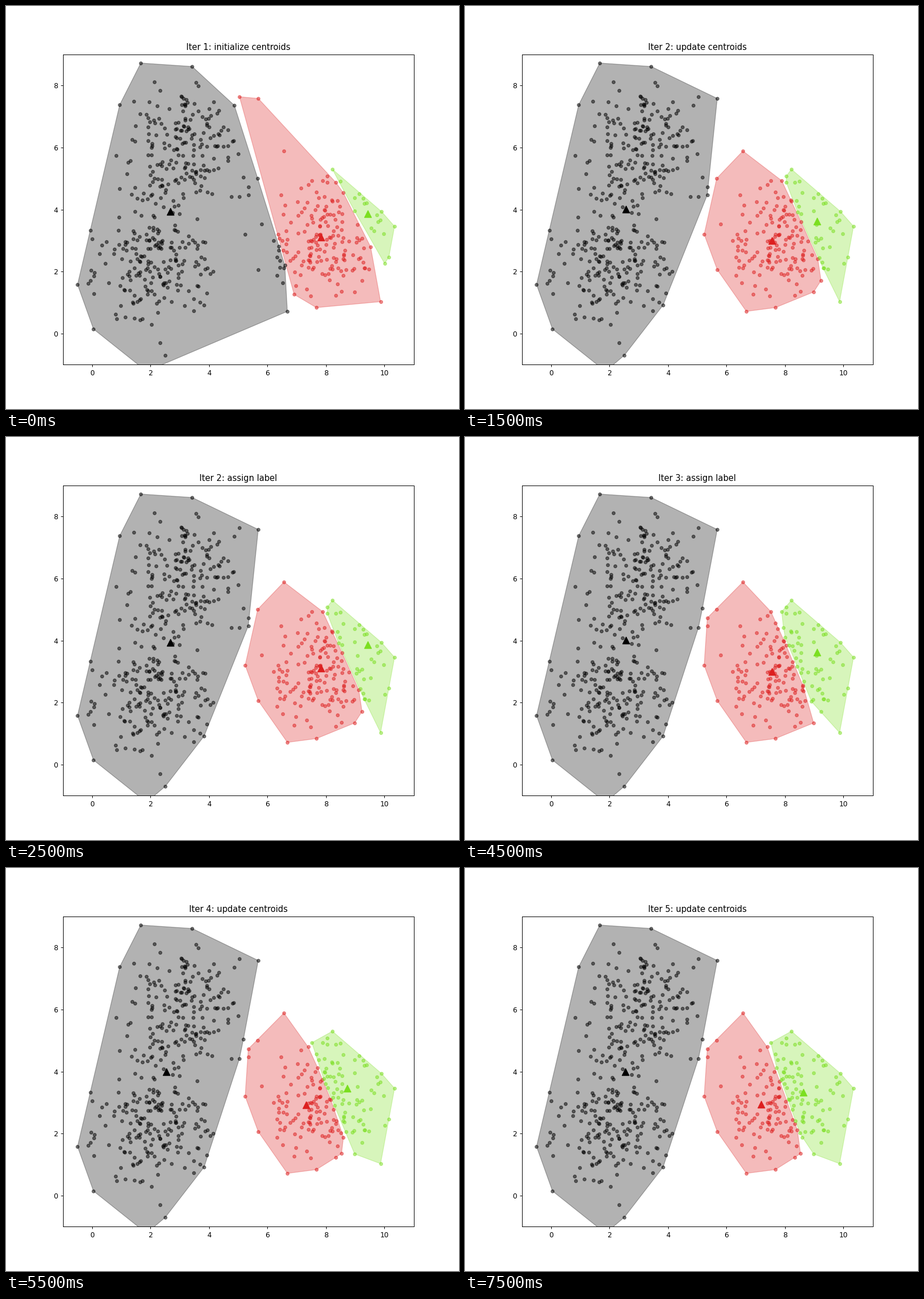
Recreate the animation shown at these times as a matplotlib script. Size 794x706 px, loop 8 s.

```python
import numpy as np
import matplotlib.pyplot as plt
from matplotlib.animation import FuncAnimation

W, H, DPI = 794, 706, 88
ORIGIN = np.array([150.5, 574.0])
UNIT = np.array([51.28, -54.36])
COLORS = ["#000000", "#dd2020", "#7bdf20"]


def to_data(*stage_xy):
    return (np.array(stage_xy, float) - ORIGIN) / UNIT


# Outlines that hold the random points, in stage pixels
LEFT = to_data((236, 100), (326, 106), (400, 174), (416, 300), (409, 334),
               (347, 524), (279, 612), (246, 640), (153, 566), (125, 488),
               (148, 393), (199, 173))
RIGHT = to_data((424.5, 317), (441, 302), (536, 306), (572, 286), (658, 360),
                (681, 386), (656.5, 518), (611, 501), (578, 507), (493, 535),
                (442, 462), (419, 400))
# Outliers and points on the borders between clusters
LOOSE = to_data((409, 159), (442, 162), (487, 254), (424.5, 331), (487, 459),
                (477, 400), (508, 490), (578, 309), (591, 327), (639, 422),
                (671, 440), (624, 481), (555, 306), (588, 500), (608, 436))

# Random points: centre, spread, count, outline
BLOBS = [((2.1, 2.2), 1.0, 188, LEFT),
         ((3.0, 6.0), 1.0, 188, LEFT),
         ((7.85, 3.0), 0.9, 165, RIGHT)]

# Start of each centroid, then its place after each update
CENTROIDS = [to_data(*row) for row in (
    [(361, 446), (593, 374), (630, 351)],
    [(288, 360.5), (551.5, 405), (633.5, 364)],
    [(281.5, 356.5), (537.5, 411.5), (616.5, 377)],
    [(281, 357), (529.5, 413.5), (603.5, 382.5)],
    [(281, 357), (525.5, 415), (598, 386)],
    [(281, 357), (519, 414), (593, 393)],
)]


def half_hull(pts):
    chain = []
    for p in pts:
        while len(chain) > 1:
            a, b = chain[-2:]
            if (b[0] - a[0]) * (p[1] - a[1]) > (b[1] - a[1]) * (p[0] - a[0]):
                break
            chain.pop()
        chain.append(p)
    return chain[:-1]


def hull(pts):
    """Convex hull, counter-clockwise."""
    order = sorted(map(tuple, pts))
    return np.array(half_hull(order) + half_hull(order[::-1]))


def inside(pts, poly):
    edge = np.roll(poly, -1, axis=0) - poly
    rel = pts[:, None] - poly[None]
    return (edge[:, 0] * rel[..., 1] > edge[:, 1] * rel[..., 0]).all(axis=1)


def make_points():
    rng = np.random.default_rng(3)
    parts = [LEFT, RIGHT, LOOSE]
    for center, spread, count, outline in BLOBS:
        cand = rng.normal(center, spread, (2 * count, 2))
        parts.append(cand[inside(cand, hull(outline))][:count])
    return np.vstack(parts)


def split(pts, centers):
    """Group the points by their nearest centroid."""
    label = ((pts[:, None] - centers) ** 2).sum(axis=2).argmin(axis=1)
    return [pts[label == k] for k in range(len(centers))]


points = make_points()
groups = [split(points, centers) for centers in CENTROIDS[:-1]]
hulls = [[hull(g) for g in group] for group in groups]

fig, ax = plt.subplots(figsize=(W / DPI, H / DPI), dpi=DPI)
fig.subplots_adjust(left=99.6 / W, right=0.9, bottom=0.11, top=0.88)
ax.set_xlim(-1, 11)
ax.set_ylim(-1, 9)
ax.set_xticks(range(0, 11, 2))
ax.set_yticks(range(0, 9, 2))
title = ax.set_title("")

areas, dots, marks = [], [], []
for k, color in enumerate(COLORS):
    areas += ax.fill(*hulls[0][k].T, facecolor=color, edgecolor=color,
                     alpha=0.3, lw=1, zorder=1)
    dots.append(ax.scatter([], [], s=20, color=color, alpha=0.5, zorder=2))
    marks.append(ax.scatter([], [], s=100, marker="^", color=color, zorder=3))


def draw(i):
    # The first step lasts one tick, later ones two
    n, assigning = divmod((i + 1) // 2, 2)
    if assigning:
        action = "assign label"
    else:
        action = "update centroids" if n else "initialize centroids"
    title.set_text(f"Iter {n + 1}: {action}")
    centers = CENTROIDS[n if assigning else n + 1]
    for k in range(len(COLORS)):
        areas[k].set_xy(hulls[n][k])
        dots[k].set_offsets(groups[n][k])
        marks[k].set_offsets(centers[k:k + 1])
    return [title, *areas, *dots, *marks]


anim = FuncAnimation(fig, draw, frames=16, interval=500, repeat=True,
                     repeat_delay=0, blit=False)
plt.show()
```
